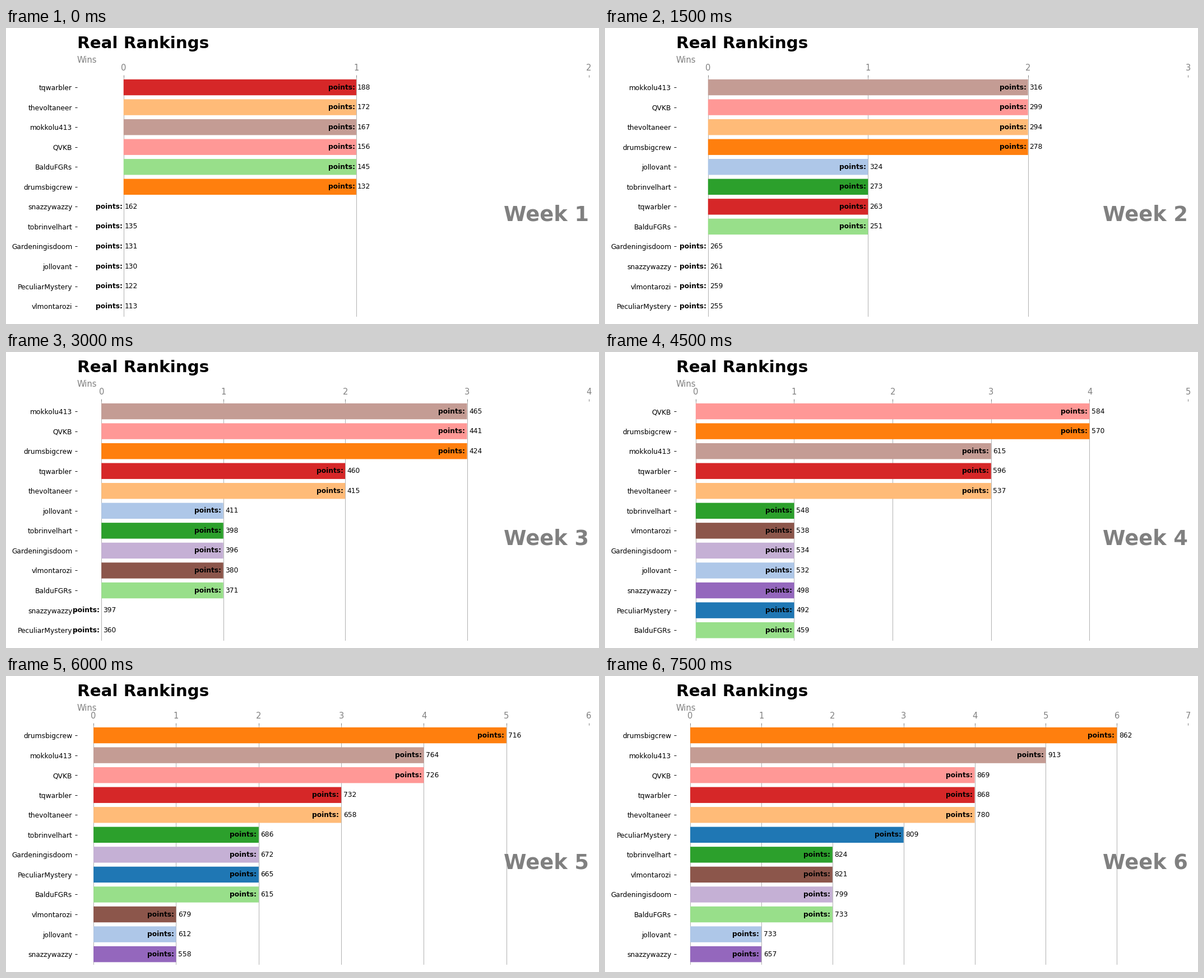
A matplotlib script for the animation above (8 s loop, 1058 by 529 pixels).

```python
import matplotlib.pyplot as plt
from matplotlib.animation import FuncAnimation

WIDTH, HEIGHT = 1058, 529
LEFT, RIGHT = 126.7, 1040.1   # plot edges in pixels from the top left
TOP, BOTTOM = 87.6, 515.6
GREY = "gray"
STEP_MS, STEPS, STEPS_PER_WEEK = 500, 16, 3

# name, weekly results, points after the first and the last week;
# listed in palette order, so each player's position picks the colour
PLAYERS = dict(zip("ABCDEFGHIJKL", [
    ("PeculiarMystery", "LLLWWW", 122, 809),
    ("jollovant", "LWLLLL", 130, 733),
    ("drumsbigcrew", "WWWWWW", 132, 862),
    ("thevoltaneer", "WWLWLW", 172, 780),
    ("tobrinvelhart", "LWLLWL", 135, 824),
    ("BalduFGRs", "WLLLWL", 145, 733),
    ("tqwarbler", "WLWWLW", 188, 868),
    ("QVKB", "WWWWLL", 156, 869),
    ("snazzywazzy", "LLLWLL", 162, 657),
    ("Gardeningisdoom", "LLWLWL", 131, 799),
    ("vlmontarozi", "LLWLLW", 113, 821),
    ("mokkolu413", "WWWLWW", 167, 913),
]))
COLORS = dict(zip(PLAYERS, plt.cm.tab20.colors))

STANDINGS = ["GDLHFCIEJBAK", "LHDCBEGFJIKA", "LHCGDBEJKFIA",
             "HCLGDEKJBIAF", "CLHGDEJAFKBI", "CLHGDAEKJFBI"]

fig = plt.figure(figsize=(12, 6), dpi=WIDTH / 12, facecolor="white")
ax = fig.add_axes([LEFT / WIDTH, 1 - BOTTOM / HEIGHT,
                   (RIGHT - LEFT) / WIDTH, (BOTTOM - TOP) / HEIGHT])


def totals(week):
    """Wins and points by rank; points grow at a steady pace per player."""
    progress = week / (len(STANDINGS) - 1)
    scores = [(results[:week + 1].count("W"),
               round(first + (last - first) * progress))
              for _, results, first, last in PLAYERS.values()]
    return zip(*sorted(scores, reverse=True))


def caption(x, y, text, **style):
    ax.text(x, y, text, transform=ax.transAxes, **style)


def draw_week(step):
    week = step // STEPS_PER_WEEK
    order = STANDINGS[week]
    wins, points = totals(week)
    ranks = range(len(order))
    best = max(wins)
    gap = best / 200

    ax.clear()
    ax.barh(ranks, wins, height=0.8, snap=False,
            color=[COLORS[key] for key in order])
    for rank, won, score in zip(ranks, wins, points):
        ax.text(won - gap, rank, "points:", size=10, weight="bold",
                ha="right", va="center")
        ax.text(won + gap, rank, str(score), size=10, ha="left", va="center")

    ax.set_xlim(-0.2, best + 1)
    ax.set_ylim(len(order) - 0.482, -0.518)
    ax.set_xticks(range(best + 2))
    ax.set_yticks(ranks, [PLAYERS[key][0] for key in order])
    ax.xaxis.set_ticks_position("top")
    ax.tick_params(axis="x", colors=GREY, labelsize=12)
    ax.tick_params(axis="y", labelsize=10)
    ax.grid(axis="x", linestyle="-")
    ax.set_axisbelow(True)
    ax.set_frame_on(False)

    caption(0, 1.12, "Real Rankings", size=24, weight="bold")
    caption(0, 1.06, "Wins", size=12, color=GREY)
    caption(1, 0.4, f"Week {week + 1}", size=30, weight="bold",
            color=GREY, ha="right")


animation = FuncAnimation(fig, draw_week, frames=STEPS, interval=STEP_MS,
                          init_func=lambda: draw_week(0),
                          repeat=True, repeat_delay=0)
plt.show()
```
